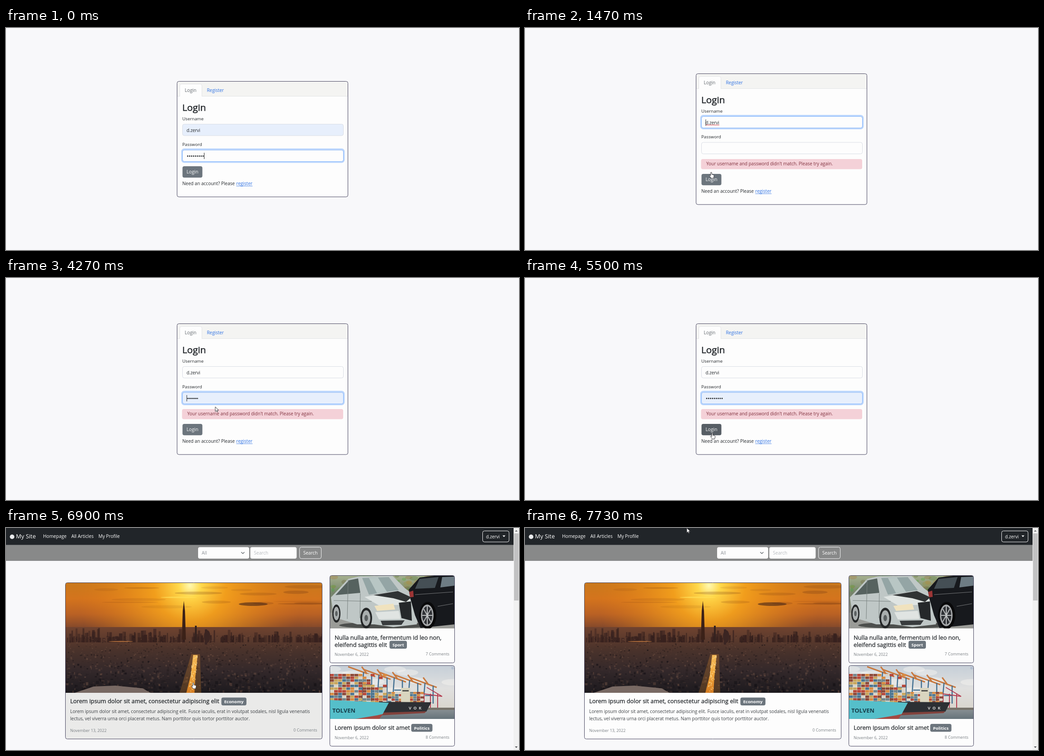
An HTML page with a canvas that plays this animation: 1135x493 px, repeating every 7790 ms.

```html
<!DOCTYPE html>
<html lang="en">
<head>
<meta charset="utf-8">
<title>Login walkthrough</title>
<style>
html, body { margin: 0; width: 100%; height: 100%; overflow: hidden; background: #f8f8fa; }
canvas { display: block; }
</style>
</head>
<body>
<canvas id="stage" width="1135" height="493"></canvas>
<script>
const W = 1135, H = 493, LOOP = 7790;
const ctx = document.getElementById('stage').getContext('2d');
const USER = 'd.zervi';
const INK = '#24282c', MUTED = '#7b8085', GREY = '#6c757d', LINK = '#2b70e4', EDGE = '#47455f';
const PAPER = '#fdfdfd', BACK = '#f8f8fa';

const clamp = v => Math.max(0, Math.min(1, v));
const ramp = (t, a, b) => clamp((t - a) / (b - a));
const within = (t, a, b) => t >= a && t < b;

// y is the middle of the capitals
function text(s, x, y, size, color = INK, { align = 'left', weight = 400, heavy = 0 } = {}) {
  ctx.font = `${weight} ${size}px "Open Sans", "Noto Sans", sans-serif`;
  ctx.textAlign = align;
  ctx.fillStyle = ctx.strokeStyle = color;
  ctx.fillText(s, x, y + size * .36);
  if (heavy) {
    ctx.lineWidth = heavy;
    ctx.strokeText(s, x, y + size * .36);
  }
}

function box(x, y, w, h, r, fill, stroke, line = 1) {
  ctx.beginPath();
  ctx.roundRect(x, y, w, h, r);
  if (fill) { ctx.fillStyle = fill; ctx.fill(); }
  if (stroke) { ctx.strokeStyle = stroke; ctx.lineWidth = line; ctx.stroke(); }
}

function rect(g, color, x, y, w, h) {
  g.fillStyle = color;
  g.fillRect(x, y, w, h);
}

function poly(g, color, ...p) {
  g.beginPath();
  for (let i = 0; i < p.length; i += 2) g.lineTo(p[i], p[i + 1]);
  g.closePath();
  g.fillStyle = color;
  g.fill();
}

function oval(g, color, x, y, rx, ry) {
  g.beginPath();
  g.ellipse(x, y, rx, ry, 0, 0, 7);
  g.fillStyle = color;
  g.fill();
}

function strokes(g, color, width, ...lines) {
  g.strokeStyle = color;
  g.lineWidth = width;
  g.beginPath();
  for (const [a, b, c, d] of lines) { g.moveTo(a, b); g.lineTo(c, d); }
  g.stroke();
}

function gradient(g, y0, y1, ...colors) {
  const fade = g.createLinearGradient(0, y0, 0, y1);
  colors.forEach((c, i) => fade.addColorStop(i / (colors.length - 1), c));
  return fade;
}

function random(seed) {
  return () => (seed = (seed * 16807) % 2147483647) / 2147483647;
}

function picture(w, h, paint) {
  const c = document.createElement('canvas');
  c.width = w;
  c.height = h;
  paint(c.getContext('2d'), w, h);
  return c;
}

const city = picture(568, 244, (g, w, h) => {
  const rnd = random(41);
  rect(g, gradient(g, 0, 104, '#c9791c', '#d4741d', '#b96124', '#7c452c'), 0, 0, w, 104);
  const sun = g.createRadialGradient(275, 6, 0, 275, 6, 250);
  sun.addColorStop(0, '#fff8b0');
  sun.addColorStop(.1, '#ffd84a');
  sun.addColorStop(.32, 'rgba(247,165,28,.85)');
  sun.addColorStop(1, 'rgba(225,120,20,0)');
  rect(g, sun, 0, 0, w, 104);
  for (let i = 0; i < 16; i++)
    oval(g, `rgba(120,58,18,${.1 + rnd() * .2})`, rnd() * w, 8 + rnd() * 46, 20 + rnd() * 45, 1 + rnd() * 3);
  oval(g, 'rgba(80,44,24,.65)', 415, 47, 32, 4);
  oval(g, 'rgba(255,225,90,.7)', 250, 32, 40, 1.5);
  rect(g, gradient(g, 98, h, '#70432f', '#4b332b', '#33282a', '#1d1a1e'), 0, 98, w, h - 98);
  for (let i = 0; i < 170; i++) {
    const x = rnd() * w, tall = 4 + rnd() * rnd() * 25;
    rect(g, `rgba(55,33,30,${.4 + rnd() * .5})`, x, 126 - tall, 2 + rnd() * 6, tall + 6);
  }
  for (let i = 0; i < 1300; i++) {
    const y = 116 + rnd() * 124, near = (y - 100) / 140;
    const tone = rnd() < .52 ? `rgba(18,15,19,${rnd() * .6})` : `rgba(150,108,86,${rnd() * .32})`;
    rect(g, tone, rnd() * w, y, 1 + rnd() * 5 * near + 1, 1 + rnd() * 7 * near);
  }
  oval(g, '#a8693a', 122, 130, 27, 1.2);
  poly(g, '#786963', 20, h, 62, 230, 110, 228, 170, 234, 188, h);
  rect(g, '#3a2523', 308, 103, 5, 34);
  rect(g, '#34221f', 286, 95, 4, 35);
  oval(g, '#3b2522', 313, 119, 7, 14);
  poly(g, '#3b2118', 261.5, 40, 264, 62, 266, 126, 257, 126, 259, 62);
  poly(g, 'rgba(233,145,45,.25)', 278, 158, 297, 158, 300, h, 252, h);
  poly(g, gradient(g, 158, h, '#f0b85b', '#f2a93d', '#d47c22'), 282, 160, 292, 160, 287, 208, 285, h, 267, h, 277, 204);
  for (let i = 0; i < 60; i++) {
    const y = 162 + rnd() * 80;
    rect(g, '#ffe5a0', 286 - (y - 160) * .1 + (rnd() - .5) * 12, y, 1, 2);
  }
});

const crash = picture(275, 117, (g, w, h) => {
  const rnd = random(9);
  rect(g, gradient(g, 0, h, '#a5b08f', '#75836a', '#8b8e87', '#8d8f8b'), 0, 0, w, h);
  for (let i = 0; i < 90; i++)
    oval(g, `rgba(${60 + rnd() * 120},${90 + rnd() * 90},60,.35)`, rnd() * w, rnd() * 34, 3 + rnd() * 7, 2 + rnd() * 4);
  rect(g, '#9a9b97', 0, 82, w, 35);
  oval(g, '#4d4f4d', 120, 110, 100, 7);
  poly(g, '#bfc7c6', 2, 48, 40, 7, 66, 1, 138, 0, 166, 28, 190, 46, 196, 80, 192, 108, 140, 114, 98, 108, 60, 108, 8, 92);
  poly(g, '#56625f', 12, 43, 42, 10, 62, 6, 67, 38);
  poly(g, '#94a5a5', 71, 5, 130, 3, 152, 32, 86, 42);
  poly(g, '#b8c6c4', 86, 5, 106, 4, 126, 36, 104, 39);
  poly(g, '#dfe4e2', 76, 47, 150, 35, 176, 50, 182, 64, 108, 66);
  poly(g, '#303334', 96, 43, 150, 34, 180, 48, 168, 58, 140, 50);
  poly(g, '#25282a', 152, 60, 179, 57, 181, 100, 158, 94);
  poly(g, '#f0e2be', 98, 67, 140, 62, 144, 75, 104, 78);
  poly(g, '#e0e4e2', 100, 81, 152, 78, 156, 96, 108, 97);
  poly(g, '#383b3d', 112, 100, 165, 99, 158, 109, 116, 110);
  strokes(g, '#78817f', 1, [40, 9, 38, 96], [67, 39, 66, 94], [8, 55, 92, 57]);
  for (const [x, y, rx, ry] of [[80, 94, 13, 23], [14, 84, 9, 20]]) {
    oval(g, '#252728', x, y, rx, ry);
    oval(g, '#a9aeae', x, y, rx * .7, ry * .75);
    oval(g, '#5a5f60', x, y, rx * .3, ry * .3);
  }
  poly(g, '#17191d', 174, 31, 198, 4, 230, 0, w, 0, w, 108, 200, 116, 188, 88, 178, 52);
  poly(g, '#454f55', 198, 7, 240, 3, 232, 27, 188, 29);
  poly(g, '#6e7c84', 248, 3, w, 2, w, 22, 244, 26);
  poly(g, '#9c3535', 175, 36, 184, 33, 185, 47, 177, 48);
  strokes(g, '#77797b', 1, [188, 42, 272, 36], [238, 68, 272, 62]);
  oval(g, '#09090a', 216, 88, 19, 30);
  oval(g, '#a4a6a8', 215, 88, 14, 24);
  oval(g, '#303236', 215, 88, 11, 20);
  for (let a = 0; a < 6.2; a += Math.PI / 4)
    strokes(g, '#c1c3c4', 2, [215, 88, 215 + 11 * Math.cos(a), 88 + 20 * Math.sin(a)]);
});

const port = picture(275, 118, (g, w, h) => {
  const rnd = random(77);
  const paints = ['#b8483a', '#d98c43', '#d9d3c6', '#4e7691', '#8c4a3a', '#c9a75d', '#74868c'];
  rect(g, gradient(g, 0, 100, '#c6cfd8', '#e0e0df', '#d8d4cc'), 0, 0, w, h);
  for (let i = 0; i < 14; i++) oval(g, 'rgba(245,244,240,.45)', rnd() * w, rnd() * 55, 24, 7);
  for (let i = 0; i < 5; i++) {
    const x = 74 + i * 34, top = 14 + i * 6;
    strokes(g, '#c9793f', 3, [x - 34, top - 12, x + 26, top + 10], [x - 4, top - 12, x + 8, top + 4]);
    strokes(g, '#426f91', 2.5, [x, top, x - 4, 84], [x + 18, top + 6, x + 18, 84], [x, top + 28, x + 18, top + 28]);
  }
  strokes(g, '#b43c50', 2, [208, 62, 208, 98], [222, 62, 222, 98], [238, 62, 238, 98], [192, 60, 248, 68], [214, 48, 248, 68]);
  rect(g, gradient(g, 96, h, '#899194', '#66737a'), 0, 96, w, 22);
  rect(g, '#77736b', 180, 93, 95, 5);
  for (let y = 18; y < 82; y += 6)
    for (let x = 0; x < 122; x += 9)
      if (y > 46 || x < 52 + y || rnd() < .25) rect(g, paints[Math.floor(rnd() * paints.length)], x, y, 8.4, 5.4);
  for (let y = 58; y < 82; y += 5)
    for (let x = 128; x < 208; x += 8) rect(g, paints[Math.floor(rnd() * paints.length)], x, y, 7.4, 4.5);
  rect(g, '#d9d5bf', 157, 49, 20, 32);
  rect(g, '#50504d', 160, 54, 14, 3);
  poly(g, '#2d3034', 108, 80, 224, 81, 213, 102, 110, 107);
  poly(g, '#81423c', 112, 104, 213, 101, 209, 105, 112, 110);
  poly(g, '#55bfca', 0, 76, 86, 80, 130, 82, 116, 108, 102, 117, 0, 118);
  poly(g, '#a34a43', 56, 118, 104, 110, 117, 107, 109, 118);
  g.font = '700 13px "Open Sans", sans-serif';
  g.fillStyle = '#173e4a';
  g.fillText('TOLVEN', 5, 104);
  g.font = '700 9px "Open Sans", sans-serif';
  g.fillStyle = '#d8d8d6';
  g.fillText('V  O  K', 174, 97);
  oval(g, '#b3bfd0', 271, 5, 3, 3);
});

const arrow = new Path2D('M0 0V10.500L2.500 8.300L4 11.800L5.700 11L4.200 7.700H7.500Z');
const hand = new Path2D('M-1.200 1Q0-.6 1.200 1V5L5 6Q6.500 6.500 6.200 9L5 13.500H0L-3.800 8.500Q-4.200 6.500-2.500 7L-1.200 8.200Z');

// time, hotspot x, hotspot y, pointer used from here on
const track = [
  [270, 0, 486, 'arrow'], [740, 412, 320, 'hand'], [2810, 412, 320, 'arrow'],
  [2930, 404, 214, 'beam'], [2970, 403, 209, 'beam'], [3200, 403, 209, 'beam'],
  [3430, 432, 268, 'beam'], [3770, 432, 268, 'arrow'], [3870, 463, 286, 'arrow'],
  [4470, 463, 286, 'arrow'], [4500, 493, 313, 'arrow'], [4730, 493, 313, 'arrow'],
  [5150, 418, 338, 'hand'], [5330, 414.5, 344, 'hand'], [6900, 414.5, 344, 'hand'],
  [7330, 363, 116, 'hand'], [7370, 362, 100, 'arrow'], [7670, 358, 0, 'arrow'], [LOOP, 358, 0, 'arrow']
];

function pointer(t) {
  if (t < track[0][0]) return;
  const i = track.findLastIndex(k => k[0] <= t);
  const a = track[i], b = track[i + 1] || a;
  const p = ramp(t, a[0], b[0] + (a === b));
  ctx.save();
  ctx.translate(a[1] + (b[1] - a[1]) * p, a[2] + (b[2] - a[2]) * p);
  if (a[3] === 'beam') {
    strokes(ctx, '#333', 1, [-2.5, -6, 2.5, -6], [0, -6, 0, 6], [-2.5, 6, 2.5, 6]);
  } else {
    const shape = a[3] === 'hand' ? hand : arrow;
    ctx.fillStyle = '#fff';
    ctx.strokeStyle = '#3c3c40';
    ctx.lineWidth = 1;
    ctx.fill(shape);
    ctx.stroke(shape);
  }
  ctx.restore();
}

function field(y, focus, fill) {
  if (focus > 0) box(389.2, y - 1.4, 358.6, 28.8, 5, null, `rgba(134,183,254,${.55 * focus})`, 3);
  box(390.5, y + .5, 356, 25.5, 4, fill, '#d9dde5');
  if (focus > 0) box(390.5, y + .5, 356, 25.5, 4, null, `rgba(134,183,254,${focus})`);
}

function bullets(n, step, r, y) {
  for (let i = 0; i < n; i++) oval(ctx, INK, 402 + i * step, y, r, r);
}

const caret = (x, y) => rect(ctx, '#222', x, y - 7, 1, 14);

function login(t) {
  const failed = t >= 1300, d = failed ? -17 : 0, low = failed ? 17 : 0;
  box(378.5, 118.5 + d, 378, 256.5 + (failed ? 34 : 0), 4, PAPER);
  rect(ctx, '#f4f4f2', 379, 119 + d, 377, 33);
  rect(ctx, '#e3e4e6', 379, 151 + d, 377, 1);
  box(384.5, 124.5 + d, 49, 30, [4, 4, 0, 0], PAPER, '#e3e4e6');
  rect(ctx, PAPER, 384, 152 + d, 50, 4);
  box(378.5, 118.5 + d, 378, failed ? 290.5 : 256.5, 4, null, EDGE);
  text('Login', 395.5, 138 + d, 10.2, '#60666c');
  text('Register', 444.5, 138 + d, 9.9, LINK);
  text('Login', 390, 176.5 + d, 20.7, INK, { heavy: .6 });
  text('Username', 390, 201 + d, 9.75);
  text('Password', 390, 258 + d, 9.75);

  const nameFocus = failed ? ramp(t, 1300, 1470) * (1 - ramp(t, 3200, 3400)) : 0;
  field(213 + d, nameFocus, failed ? PAPER : '#e7effc');
  text(USER, 399.5, 227 + d, 9.9);
  if (within(t, 1300, 3200)) {
    strokes(ctx, '#d9434b', 1, [400, 215.5, 430, 215.5]);
    if (!within(t, 1830, 2330) && t < 2830) caret(399.5, 210);
  }

  const preview = within(t, 3770, 4500), filled = t >= 3770;
  const passFocus = failed
    ? ramp(t, 3200, 3430) * (1 - ramp(t, 5500, 5700))
    : 1 - ramp(t, 925, 1110);
  field(270.5 + d, passFocus, filled ? '#e7effc' : PAPER);
  const dotsY = 284.5 + d;
  if (preview) bullets(8, 3.1, 1.3, dotsY);
  else if (!failed || filled) bullets(9, 4.25, 1.4, dotsY);
  if (t < 530 || within(t, 4500, 4730) || within(t, 5260, 5500)) caret(438, dotsY - .5);
  if (within(t, 3230, 3770) || within(t, 4270, 4500)) caret(399.5, dotsY - .5);

  if (failed) {
    box(389.5, 291, 356.5, 22.5, 4, '#f4d1d8');
    text("Your username and password didn't match. Please try again.", 401, 301.5, 9.96, '#80303d');
  }
  const hot = within(t, 740, 1300) || t >= 5150;
  box(390.5, 307 + low, 44, 25.2, 4, hot ? '#575e65' : GREY);
  text('Login', 412.5, 319.8 + low, 10.2, '#fff', { align: 'center' });
  text('Need an account? Please', 390, 345.8 + low, 10.05);
  text('register', 509.5, 345.8 + low, 10.05, LINK);
  strokes(ctx, LINK, .8, [509.5, 351 + low, 545.5, 351 + low]);
}

function badge(label, x, y, w) {
  box(x, y - 8.7, w, 17.4, 4, GREY);
  text(label, x + w / 2, y + .3, 9.5, '#fff', { align: 'center', weight: 700 });
}

function card(x, y, w, h, image, imageHeight, fill = PAPER) {
  box(x + .5, y + .5, w, h, 4, fill);
  if (image) {
    ctx.save();
    ctx.beginPath();
    ctx.roundRect(x + 1, y + 1, w - 1, imageHeight, [3.5, 3.5, 0, 0]);
    ctx.clip();
    ctx.drawImage(image, x + 1, y + 1);
    ctx.restore();
  }
  box(x + .5, y + .5, w, h, 4, null, EDGE);
}

const headline = (s, x, y) => text(s, x, y, 12.95, INK, { heavy: .3 });

function footer(x, right, y, date, count) {
  text(date, x, y, 8.85, MUTED);
  text(count + ' Comments', right, y - 1, 8.85, MUTED, { align: 'right' });
}

function scrollbar(thumb) {
  rect(ctx, '#f1f1f1', 1123, 0, 12, H);
  rect(ctx, '#c2c2c3', 1124, 12, 10, thumb);
  poly(ctx, '#77787a', 1126, 8, 1132, 8, 1129, 4.5);
  poly(ctx, '#55565a', 1126, 485, 1132, 485, 1129, 488.5);
}

function navigation(t) {
  const bar = t < 6170 ? 11 : 23 + 13 * ramp(t, 6170, 6270);
  rect(ctx, '#888989', 0, 37, 1123, bar);
  rect(ctx, '#212529', 0, 0, 1123, 37.5);
  oval(ctx, '#e9eaec', 13.5, 19.5, 5, 5);
  text('My Site', 22, 18.8, 13, '#fff');
  text('Homepage', 82, 18.8, 10.17, '#fff');
  text('All Articles', 144.5, 18.8, 10.25, '#fff');
  text('My Profile', 204.5, 18.8, 10.15, '#fff');
  box(1054.5, 6.5, 58.5, 24.5, 4, null, '#f5f5f6');
  text(USER, 1062, 19, 9.9, '#fff');
  poly(ctx, '#fff', 1098.500, 16.500, 1105, 16.500, 1101.700, 20);
  if (t < 6270) return;
  box(425, 42.5, 113, 25.5, 4, PAPER);
  text('All', 433, 55.5, 10.1, '#8c9197');
  strokes(ctx, '#555b60', 1.2, [520.500, 53.500, 524, 57], [524, 57, 527.500, 53.500]);
  box(540.5, 42.5, 102.5, 25.5, 4, PAPER);
  text('Search', 548.5, 55.5, 10.1, '#b9bcc0');
  box(649.5, 42.5, 48, 25.5, 4, null, '#f3f3f4');
  text('Search', 673.5, 55.5, 10.1, '#fff', { align: 'center' });
}

function home(t) {
  const loaded = t >= 6170;
  const d = loaded ? 0 : -21.5, s = loaded ? 118 : 0;
  const hovered = within(t, 6270, 7370);

  card(131, Math.round(121 + d), 568, 347, city, 244, hovered ? '#eaeae9' : PAPER);
  headline('Lorem ipsum dolor sit amet, consectetur adipiscing elit', 142, 384.7 + d);
  badge('Economy', 476.5, 385.3 + d, 55.5);
  text('Lorem ipsum dolor sit amet, consectetur adipiscing elit. Fusce iaculis, erat in volutpat sodales, nisl ligula venenatis', 142, 407.5 + d, 10.05, '#3b3f43');
  text('lectus, vel viverra urna orci placerat metus. Nam porttitor quis tortor porttitor auctor.', 142, 423.3 + d, 10.05, '#3b3f43');
  footer(142, 688.5, 450.3 + d, 'November 13, 2022', 0);

  card(716, 105, 276, 194, crash, 117);
  headline('Nulla nulla ante, fermentum id leo non,', 727, 243);
  headline('eleifend sagittis elit', 727, 259);
  badge('Sport', 848.5, 259.3, 38.5);
  footer(727, 981, 281.3, 'November 6, 2022', 7);

  card(716, 305, 276, 61 + s, loaded && port, 118);
  headline('Lorem ipsum dolor sit amet', 727, 325.3 + s);
  badge('Politics', 896.5, 325.8 + s, 47);
  footer(727, 981, 348 + s, 'November 6, 2022', 8);

  if (!loaded) {
    card(131, 453, 422, 62);
    headline('Fusce lectus risus, sodales id tellus non', 142, 472.5);
    badge('Economy', 379, 473, 55.5);
    footer(142, 542, 495.5, 'November 6, 2022', 6);
    card(569, 453, 423, 62);
    headline('Lorem ipsum dolor sit amet, consectetur adipiscing elit', 581, 472.5);
    badge('Chronicle', 915, 473, 57.5);
    footer(581, 981, 495.5, 'November 10, 2022', 4);
  }
  navigation(t);
  scrollbar(loaded ? 149 : 174);
}

function frame(now) {
  const t = now % LOOP;
  rect(ctx, BACK, 0, 0, W, H);
  ctx.lineJoin = 'round';
  (t < 6000 ? login : home)(t);
  pointer(t);
  requestAnimationFrame(frame);
}
requestAnimationFrame(frame);
</script>
</body>
</html>
```
